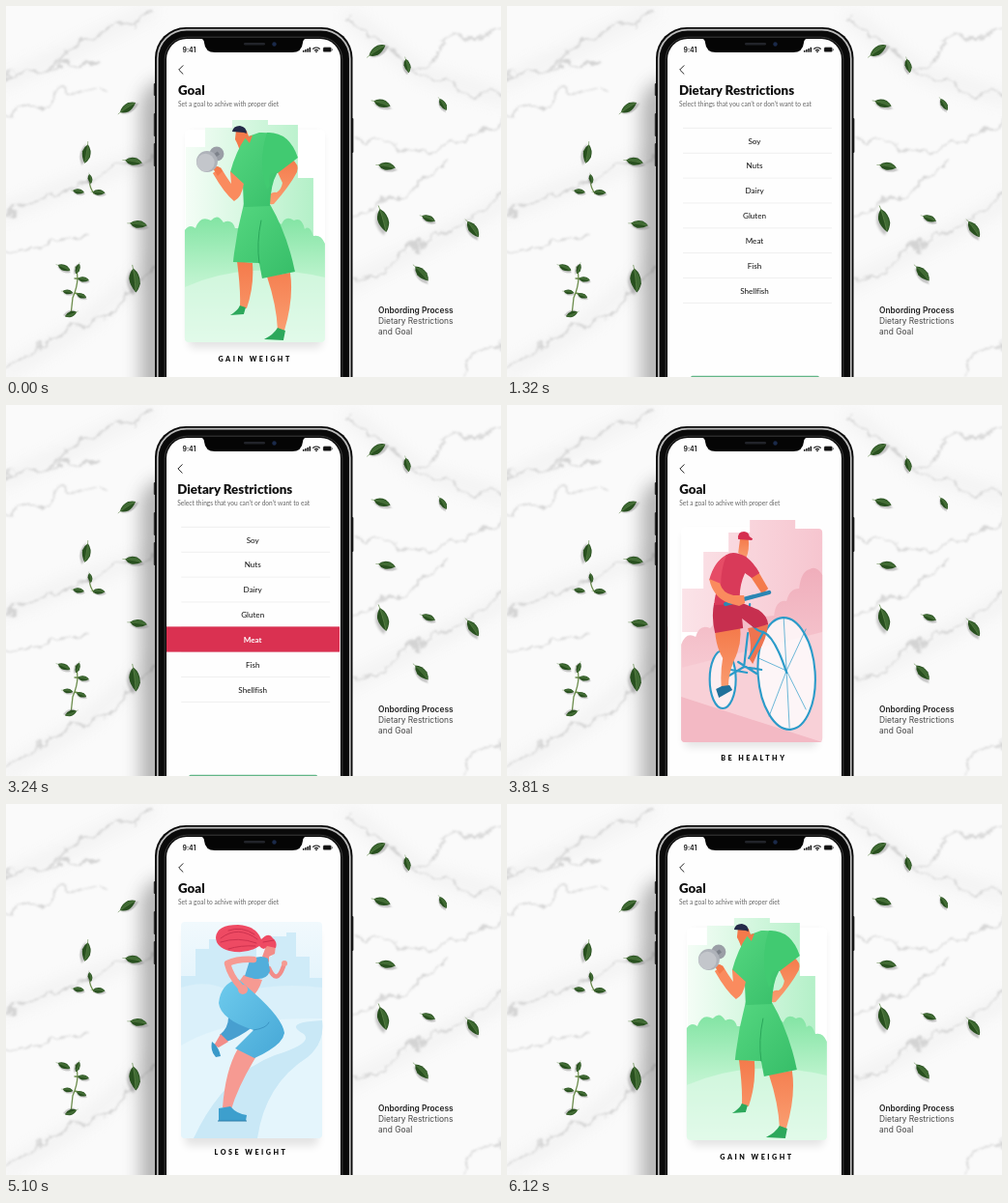
These frames come from a looping animation (512x384 px, 6.15 s). An HTML page:

```html
<!DOCTYPE html>
<html lang="en">
<head>
<meta charset="utf-8">
<title>Onbording Process</title>
<style>
html, body { margin: 0; width: 100%; height: 100%; overflow: hidden; background: #fafafa; }
svg { position: absolute; left: 0; top: 0; width: 512px; height: 384px; }
text { font-family: Lato, "Open Sans", sans-serif; font-variant-ligatures: none; fill: #111; }
.title { font-size: 13.3px; font-weight: 900; }
.sub { font-size: 6.62px; fill: #666; }
.row { font-size: 8.1px; text-anchor: middle; }
.cap { font-size: 7.2px; font-weight: 900; letter-spacing: 2.5px; }
.note { font: 8.4px Inter, sans-serif; fill: #444; }
.line { fill: none; stroke-linecap: round; stroke-linejoin: round; }
</style>
</head>
<body>
<svg viewBox="0 0 512 384">
  <defs>
    <filter id="rough" x="-10%" y="-10%" width="120%" height="120%">
      <feTurbulence type="fractalNoise" baseFrequency=".04" numOctaves="4" seed="4"/>
      <feDisplacementMap in="SourceGraphic" scale="30" xChannelSelector="R" yChannelSelector="G"/>
      <feGaussianBlur stdDeviation="1.1"/>
    </filter>
    <filter id="soft" x="-50%" y="-50%" width="200%" height="200%"><feGaussianBlur stdDeviation="9"/></filter>
    <filter id="leafShade" x="-30%" y="-60%" width="180%" height="260%"><feGaussianBlur stdDeviation=".9"/></filter>
    <g id="leaf">
      <path d="M-10 1Q-4 -6 4 -4Q9 -2 11 1Q5 6 -2 5Q-7 4 -10 1" transform="translate(1 2)" fill="#777" opacity=".4" filter="url(#leafShade)"/>
      <path d="M-10 0Q-5 -6 3 -5Q8 -3 10 0Q4 5 -2 5Q-7 4 -10 0" fill="#28501f"/>
      <path d="M-9 0Q-4 -5 3 -4Q7 -3 9 0Q2 -1 -9 0" fill="#3f6a33"/>
      <path d="M-13 .6Q-6 -.6 9 0" fill="none" stroke="#648a4e" stroke-width=".6"/>
    </g>
  </defs>
  <rect width="512" height="384" fill="#fafafa"/>
  <g filter="url(#soft)" class="line" stroke="#dcdcdc" stroke-width="9" opacity=".45">
    <path d="M-5 80L70 45L150 5M-5 215L60 188L160 150M350 290L440 245L520 200M355 10L430 70L515 95M0 380L80 330L160 260"/>
  </g>
  <g filter="url(#rough)" class="line" stroke="#c8c8c8" stroke-width="2" opacity=".75">
    <path d="M-5 76L40 60L88 34L150 8M40 58L90 58M-5 118L60 92L110 84M-5 217L35 200L70 184L160 152M-5 262L40 245L85 240"/>
    <path d="M0 375L45 345L95 325L155 270M355 15L400 48L450 80L515 98M420 64L460 40L515 22M355 135L420 150L470 142L515 120"/>
    <path d="M355 292L400 262L445 240L515 198M360 215L420 190L450 166M470 384L492 360L515 345"/>
  </g>
  <rect x="139" y="75" width="190" height="400" rx="30" fill="#555" opacity=".42" filter="url(#soft)"/>
  <g id="leaves"></g>
  <g class="line" stroke="#6b8c4b" stroke-width="1.3">
    <path d="M87 178Q85 186 91 194M72 270Q77 284 69 302L67 320M71 282L83 283M71 297L80 299"/>
  </g>
  <g id="sprigs"></g>
  <text class="note" x="385" y="318" style="font-weight:600;fill:#222">Onbording Process</text>
  <text class="note" x="385" y="329">Dietary Restrictions</text>
  <text class="note" x="385" y="340">and Goal</text>
</svg>

<svg viewBox="0 0 512 384">
  <defs>
    <clipPath id="screen"><rect x="166" y="34" width="180" height="400" rx="21"/></clipPath>
    <clipPath id="page"><rect x="166" y="34" width="180" height="360"/></clipPath>
    <linearGradient id="mint"><stop stop-color="#f4fdf6"/><stop offset="1" stop-color="#b4f0c8"/></linearGradient>
    <linearGradient id="meadow" x2="0" y2="1"><stop stop-color="#82e4a3"/><stop offset=".45" stop-color="#b8f2ca"/><stop offset="1" stop-color="#f1fcf4"/></linearGradient>
    <linearGradient id="rose"><stop stop-color="#fbe3e8"/><stop offset="1" stop-color="#f6c5cf"/></linearGradient>
    <linearGradient id="rose2" x2="0" y2="1"><stop stop-color="#f0aebb"/><stop offset="1" stop-color="#fbdde2"/></linearGradient>
    <linearGradient id="sky" x2="0" y2="1"><stop stop-color="#f1f9fd"/><stop offset=".4" stop-color="#dff2fb"/><stop offset="1" stop-color="#eff9fd"/></linearGradient>
    <linearGradient id="skin" x2="0" y2="1"><stop stop-color="#f47a4b"/><stop offset="1" stop-color="#fa9d70"/></linearGradient>
    <linearGradient id="shirt" x2="1" y2="1"><stop stop-color="#55d780"/><stop offset="1" stop-color="#36bd68"/></linearGradient>
    <linearGradient id="pants" x2="1" y2="1"><stop stop-color="#6ecbed"/><stop offset="1" stop-color="#46a7d6"/></linearGradient>
    <filter id="cardBlur" x="-20%" y="-20%" width="140%" height="140%"><feGaussianBlur stdDeviation="4"/></filter>
    <rect id="shade" x="187" y="132" width="138" height="222" rx="5" fill="#000" opacity=".1" filter="url(#cardBlur)"/>
    <path id="back" d="M183 61.7L178.7 66L183 70.3" class="line" stroke="#222"/>
  </defs>

  <g fill="#333"><rect x="152.8" y="80" width="2" height="13" rx="1"/><rect x="152.8" y="111" width="2" height="24" rx="1"/><rect x="152.8" y="142" width="2" height="24" rx="1"/><rect x="357.4" y="116" width="2" height="36" rx="1"/></g>
  <rect x="154" y="22" width="204.5" height="420" rx="32" fill="#0a0a0a"/>
  <rect x="156.8" y="24.6" width="199" height="420" rx="30" fill="none" stroke="#bdbdbd" stroke-width="1.7"/>
  <rect x="164.2" y="32.2" width="183.6" height="420" rx="23" fill="none" stroke="#3a3a3a"/>
  <rect x="166" y="34" width="180" height="400" rx="21" fill="#fefefe"/>

  <g clip-path="url(#screen)">
    <g id="diet">
      <use href="#back"/>
      <text class="title" x="178" y="92">Dietary Restrictions</text>
      <text class="sub" x="178" y="104.3">Select things that you can’t or don’t want to eat</text>
      <g id="rows"></g>
      <rect x="190" y="382.8" width="133" height="6" rx="2" fill="#62b586"/>
    </g>

    <g id="goal" clip-path="url(#page)">
      <use href="#back"/>
      <text class="title" x="178" y="92">Goal</text>
      <text class="sub" x="178" y="104.3">Set a goal to achive with proper diet</text>

      <g class="card"><g transform="translate(1)">
        <use href="#shade" x="-5"/>
        <rect x="179" y="126" width="146" height="223" rx="4" fill="#fff"/>
        <path d="M180 235V190H202V152H228V132H250V119H297V128H321Q325 128 325 132V235Z" fill="url(#rose)"/>
        <path d="M179 248Q184 234 194 240Q198 226 209 231Q220 218 235 222L275 218Q277 201 288 203Q291 190 301 190Q303 172 312 170Q319 166 325 176V345Q325 349 321 349H183Q179 349 179 345Z" fill="url(#rose2)"/>
        <path d="M179 272L325 235V345Q325 349 321 349H183Q179 349 179 345Z" fill="#f8d0d7"/>
        <path d="M179 302L325 349H183Q179 349 179 345Z" fill="#f3b9c4"/>
        <g class="line" stroke="#2b9bc9" stroke-width="2.1">
          <ellipse cx="222" cy="284" rx="13.5" ry="30" fill="#fff" fill-opacity=".65"/>
          <ellipse cx="288" cy="278" rx="29.5" ry="58" fill="#fff" fill-opacity=".8" transform="rotate(-4 288 278)"/>
          <path d="M288 275L285 220M288 275L308 232M288 275L308 315M288 275L291 334M288 275L270 322M288 275L259 262M222 284L233 262" stroke-width=".7"/>
        </g>
        <path d="M248 231L269 227Q267 244 258 257L253 268L249 262Q253 248 248 231" fill="#ee7450"/>
        <path d="M222 284L244 271L262 274M244 271L248 236M250 206Q247 232 264 235Q276 240 288 277M264 235L249 262M238 266L257 278M230 274L247 277" class="line" stroke="#2b9bc9" stroke-width="2.2"/>
        <path d="M214 234L240 231Q242 248 233 266Q227 282 228 294L221 296Q219 279 222 262Q215 250 214 234" fill="url(#skin)"/>
        <path d="M215 294L221 291L229 290L232 295L218 303Z" fill="#20709a"/>
        <path d="M213 205L240 204L259 212Q268 218 269 227L255 231L242 221L243 231L214 236Q210 220 213 205" fill="#c72f4f"/>
        <path d="M249 175L258 171L269 190L263 196Z" fill="#f47a4b"/>
        <path d="M240 138H248.5Q250 150 246 159L238 153Z" fill="url(#skin)"/>
        <path d="M226 155Q233 150 246 157Q255 164 260 174L252 179L245 174Q238 189 240 206L213 207Q214 194 219 184L209 180Q214 162 226 155" fill="#d93a59"/>
        <path d="M226 155Q220 170 220 186L208 181Q213 162 226 155" fill="#e64c66"/>
        <path d="M225 206L270 194" class="line" stroke="#2b86b3" stroke-width="4.2"/>
        <path d="M208 180L219 184.5Q222 195 233 197L244 197L245 205L239 208L228 205Q212 199 208 180" fill="#fa8b5e"/>
        <path d="M238 139Q237 131 244 131Q249 131.500 249.500 136L253 138.500L252 140Z" fill="#d52f4f"/>
        <text class="cap" x="220" y="367.5">BE HEALTHY</text>
      </g></g>

      <g class="card">
        <use href="#shade" x="-2"/>
        <rect x="181" y="122" width="146" height="224" rx="4" fill="url(#sky)"/>
        <path d="M181 210V178H196V150H210V140H228V134H250V140H259V158H275V137H290V133H300V158H314V180H327V220Z" fill="#cfebf8"/>
        <path d="M181 190Q210 180 236 196Q280 184 327 190V250H181Z" fill="#daf0fa"/>
        <path d="M181 250Q230 220 327 222V342Q327 346 323 346H185Q181 346 181 342Z" fill="#e4f5fc"/>
        <path d="M327 224Q285 226 308 238Q318 248 278 260Q225 280 194 346H260Q268 290 312 262Q330 247 327 224" fill="#c9e8f6"/>
        <path d="M272 170Q280 188 287 168" class="line" stroke="#f28d89" stroke-width="4.500"/>
        <circle cx="288" cy="165" r="3" fill="#f59a92"/>
        <path d="M230 221L255 231Q240 242 228 246L221 239Q230 232 230 221" fill="#479fd0"/>
        <path d="M222 238L230 246L220 252L215 250Z" fill="#f28d89"/>
        <path d="M213 246Q220 251 222 261L217 262Q211 256 213 246" fill="#3999c9"/>
        <path d="M240 253L259 261Q240 292 233 316L224 314Q227 275 240 253" fill="#f69a92"/>
        <path d="M246 177L265 182Q260 198 250 202L238 188Z" fill="#f69a92"/>
        <path d="M240 181Q222 186 220 206Q222 223 256 234L237 253L257 263Q286 250 288 237Q286 222 257 196Z" fill="url(#pants)"/>
        <path d="M256 234Q270 232 272 226" class="line" stroke="#3c95c4"/>
        <path d="M265 158L269 147L279 146L278 155L272 158V164Z" fill="#f28d89"/>
        <path d="M252 162Q263 155 271 160L273 173Q268 186 247 178Z" fill="#51aedb"/>
        <path d="M256 161Q240 160 229 165Q232 178 243 190" class="line" stroke="#f69a92" stroke-width="6.500"/>
        <circle cx="245" cy="192" r="5" fill="#f69a92"/>
        <path d="M220 315L232 313Q239 321 249 322L248 328H220Z" fill="#3d9fcd"/>
        <path d="M219 328H249" stroke="#2c7ca8"/>
        <path d="M217 138Q218 125 240 125Q259 126 264 140Q272 132 276 139Q281 143 279 149L270 147Q267 153 262 147Q249 156 231 152Q217 148 217 138" fill="#ee4a63"/>
        <path d="M222 139Q240 125 260 140M222 143Q240 137 259 144M230 150Q243 146 258 147M230 131Q244 126 257 135M266 143L277 141" class="line" stroke="#c92f4c" stroke-width=".9"/>
        <text class="cap" x="215.5" y="363.3">LOSE WEIGHT</text>
      </g>

      <g class="card"><g transform="translate(-1)">
        <use href="#shade" x="2"/>
        <rect x="185" y="128" width="145" height="220" rx="4" fill="#fff"/>
        <path d="M186 240V146H206V126H234V118H271V123H302V178H318V240Z" fill="url(#mint)"/>
        <path d="M185 232Q190 225 196 230Q201 216 212 222Q219 214 225 224Q234 220 237 230H270Q276 218 285 226Q289 216 298 222Q306 218 309 231Q314 226 318 238Q326 236 330 246V344Q330 348 326 348H189Q185 348 185 344Z" fill="url(#meadow)"/>
        <path d="M185 291Q250 262 330 281V344Q330 348 326 348H189Q185 348 185 344Z" fill="#dcf9e5" opacity=".7"/>
        <path d="M239 264L255 266Q257 290 249 313L242 312Q243 294 239 264M270 280L294 276Q298 302 288 336L281 335Q280 310 270 280" fill="url(#skin)"/>
        <path d="M232 320Q240 315 242 310L248 312L246 319ZM267 345Q277 340 281 333L289 336L287 346Z" fill="#2ca85b"/>
        <path d="M246 205H273Q291 236 299 275L265 282L262 266L235 265Q238 235 246 205" fill="url(#shirt)"/>
        <path d="M264 222Q259 245 262 266" class="line" stroke="#2aa65a"/>
        <path d="M280 170L295 158Q304 164 301 172Q293 187 277 205Q268 206 268 200Q275 191 280 193Q285 190 286 183Z" fill="url(#skin)"/>
        <path d="M238 129H249L255 146L243 153Q240 143 237 138Z" fill="#f47a4b"/>
        <path d="M248 136L262 131Q284 130 292 144L280 174Q274 184 273 207L246 208L245 184L232 172Q238 150 248 136" fill="url(#shirt)"/>
        <path d="M270 131Q293 130 302 157L281 173Q269 171 273 186L270 190Q260 162 270 131" fill="#41ca71"/>
        <path d="M247 136L252 142L255 134" fill="#f47a4b"/>
        <circle cx="218" cy="153" r="7.5" fill="#9a9ea6"/>
        <path d="M208 161L220 152" stroke="#7d828b" stroke-width="4"/>
        <path d="M232 171L246 184Q244 198 236 202Q226 194 214 173L222 167Q228 177 233 184Z" fill="#fa8b5e"/>
        <path d="M214 168Q220 163 224 171L219 176Z" fill="#f47a4b"/>
        <circle cx="208" cy="161" r="11" fill="#aeb2b9"/><circle cx="206.5" cy="162" r="9.3" fill="#c3c6cb"/>
        <path d="M234 130Q235 124 242 124Q249 125 249 132L246 131L234 130" fill="#242a48"/>
        <text class="cap" x="219.5" y="367.5">GAIN WEIGHT</text>
      </g></g>
    </g>
  </g>

  <path d="M200 33Q205 34 205 38Q206 48 216 48H296Q306 48 307 38Q307 34 312 33Z" fill="#050505"/>
  <rect x="246" y="38" width="22" height="2.4" rx="1.2" fill="#22242a"/>
  <circle cx="277.5" cy="39.5" r="2.2" fill="#1b2a4a"/>
  <text x="182.5" y="48" style="font:600 6.9px Inter,sans-serif">9:41</text>
  <path d="M307.7 47.8V46M309.9 47.8V45M312.1 47.8V43.9M314.3 47.8V42.8" stroke="#111" stroke-width="1.5"/>
  <g class="line" stroke="#111" stroke-width="1.1"><path d="M317.7 44.3Q321 41.8 324.3 44.3M319.3 46Q321 44.7 322.7 46"/></g>
  <circle cx="321" cy="47.4" r=".8"/>
  <rect x="328" y="42.8" width="8.5" height="4.8" rx="1.3" fill="#111" stroke="#888" stroke-width=".4"/>
  <rect x="337" y="44.4" width=".9" height="1.7" fill="#666"/>
</svg>

<script>
const $ = id => document.getElementById(id);
const LOOP = 6150, WIDTH = 180;

// x, y, angle, scale
const leaf = ([x, y, a, s]) => `<use href="#leaf" transform="translate(${x} ${y}) rotate(${a}) scale(${s} ${s * .88})"/>`;
$('leaves').innerHTML = [
  [126, 105, -32, .95], [132, 161, 10, .9], [83, 153, 100, 1], [137, 226, 8, .9], [133, 284, 84, 1.25],
  [384, 46, -32, 1], [415, 62, 78, .75], [389, 101, 18, .9], [452, 102, 60, .7], [394, 166, 10, .9],
  [390, 222, 75, 1.25], [437, 220, 22, .75], [483, 231, 55, 1], [430, 277, 48, 1]
].map(leaf).join('');
$('sprigs').innerHTML = [
  [75, 192, 10, .6], [96, 193, 5, .65], [87, 179, 80, .5], [60, 271, 25, .7], [74, 272, 110, .55],
  [80, 283, 10, .6], [64, 296, 10, .55], [78, 300, 20, .55], [67, 319, 160, .65]
].map(leaf).join('');

const rowY = i => 126.4 + 25.85 * i;
let rows = '';
for (let i = 0; i < 8; i++) rows += `<path d="M182 ${rowY(i)}H336" stroke="#ececec" stroke-width=".8"/>`;
['Soy', 'Nuts', 'Dairy', 'Gluten', 'Meat', 'Fish', 'Shellfish'].forEach((name, i) => {
  rows += `<text class="row" x="256" y="${rowY(i) + 16.1}">${name}</text>`;
});
rows += `<g id="pick"><rect x="166" y="${rowY(4) - .4}" width="180" height="26.2" fill="#da3151"/>
  <text class="row" x="256" y="${rowY(4) + 16.1}" style="fill:#fff;font-weight:700">Meat</text></g>`;
$('rows').innerHTML = rows;

const clamp = u => Math.min(1, Math.max(0, u));
// quick start, long tail
const swipe = (t, start) => {
  const u = clamp((t - start) / 790);
  return u * u / (u * u + (1 - u) ** 5);
};
// slow drag, then release
const drag = (t, start, length) => {
  const u = clamp((t - start) / length);
  return u ** 4 / (u ** 4 + 4 * (1 - u) ** 2);
};
const move = (el, x) => el.setAttribute('transform', `translate(${x.toFixed(2)})`);
const cards = document.querySelectorAll('.card');

function draw(t) {
  const early = t < 2000;
  const x = WIDTH * (early ? drag(t, 375, 930) : 1 - swipe(t, 3195));
  move($('goal'), x);
  move($('diet'), x - WIDTH);
  const late = early ? t + LOOP : t;
  const pos = swipe(late, 4415) + swipe(late, 5600);
  cards.forEach((card, i) => move(card, (i - pos) * WIDTH));
  $('pick').setAttribute('opacity', early ? 0 : clamp((t - 2310) / 450));
}

const begin = performance.now();
function tick() {
  draw((performance.now() - begin) % LOOP);
  requestAnimationFrame(tick);
}
tick();
</script>
</body>
</html>
```
